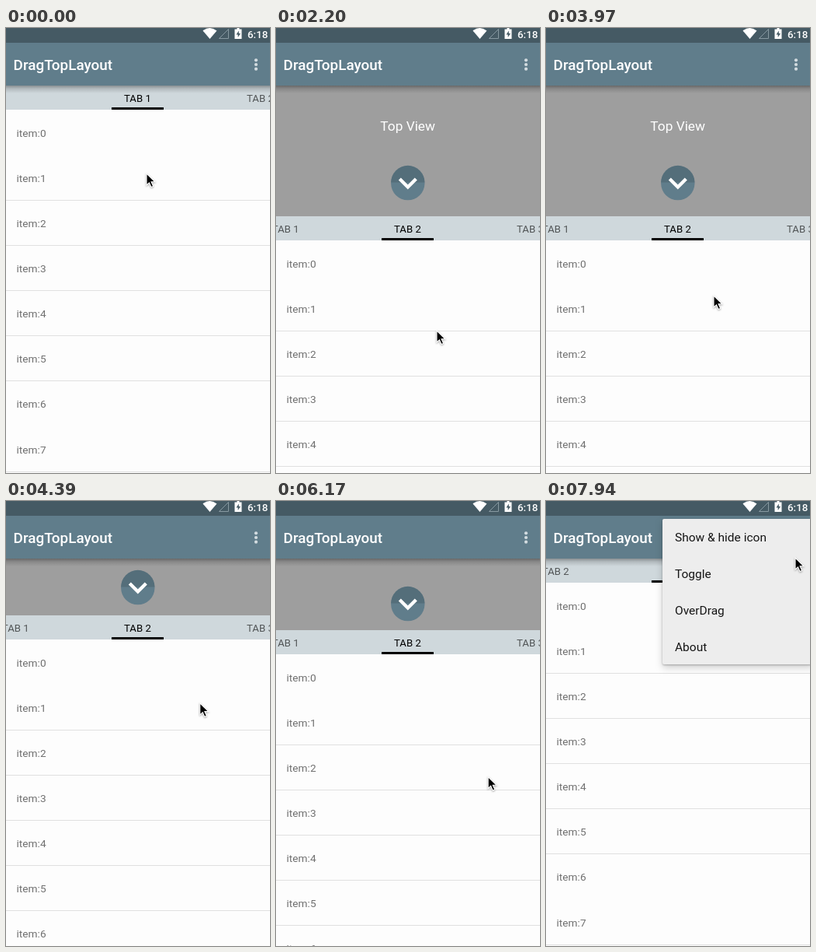
These frames come from a looping animation (340x572 px, 8 s). An HTML page:

```html
<!DOCTYPE html>
<html lang="en">
<head>
<meta charset="utf-8">
<title>DragTopLayout</title>
<style>
  html, body { margin: 0; width: 100%; height: 100%; overflow: hidden; background: #fdfdfd; }
  svg { display: block; width: 100%; height: 100%; }
  text { font-family: Roboto, sans-serif; }
  .item { font-size: 13.7px; fill: #707070; }
  .tab { font-size: 13.2px; fill: #000; }
  .menu text { font-size: 15.5px; fill: #151515; }
  .menu rect { filter: drop-shadow(0 1px 1px rgba(0, 0, 0, .25)) drop-shadow(0 4px 5px rgba(0, 0, 0, .18)); }
  .mouse { filter: drop-shadow(0 1px 1px rgba(0, 0, 0, .35)); }
</style>
</head>
<body>
<svg viewBox="0 0 340 572">
  <defs>
    <linearGradient id="shade" x2="0" y2="1">
      <stop offset="0" stop-opacity=".34"/>
      <stop offset=".4" stop-opacity=".14"/>
      <stop offset="1" stop-opacity="0"/>
    </linearGradient>
  </defs>

  <rect y="74" width="340" height="168" fill="#9e9e9e"/>
  <g id="top">
    <text x="169.7" y="132" font-size="17.3" fill="#fff" text-anchor="middle">Top View</text>
    <circle cx="169.8" cy="199.6" r="21.7" fill="#607d8b"/>
    <path d="M148.1 198.5a21.7 21.7 0 0 1 43.4 0z" fill="#546e7a"/>
    <path d="M159.3 194l10.5 10.5 10.5-10.5" fill="none" stroke="#fff" stroke-width="4.4"/>
  </g>

  <g id="content">
    <rect width="340" height="31" fill="#cfd8dc"/>
    <rect y="31" width="340" height="500" fill="#fdfdfd"/>
    <g id="lines" fill="#e0e0e0"></g>
    <g id="pages"></g>
    <g id="tabs"></g>
    <rect id="bar" y="28" width="67" height="3"/>
  </g>

  <rect y="74" width="340" height="10" fill="url(#shade)"/>
  <rect y="19" width="340" height="55" fill="#607d8b"/>
  <rect width="340" height="19" fill="#455a64"/>
  <text x="9.6" y="54" font-size="18.9" font-weight="500" fill="#fff">DragTopLayout</text>
  <g fill="#d3dce0">
    <circle cx="322" cy="41.3" r="2.1"/>
    <circle cx="322" cy="47" r="2.1"/>
    <circle cx="322" cy="52.7" r="2.1"/>
  </g>
  <path d="M253.5 3.5q9-7 18 0l-9 10.5z" fill="#fff"/>
  <path d="M274.5 13.5l12-12v12z" fill="none" stroke="#8799a1"/>
  <path d="M294.5 1.5h3V0h3v1.5h3V14h-9z" fill="#fff"/>
  <path d="M299.8 3.5l-3.3 5h2.2V12l3.3-5h-2.2z" fill="#455a64"/>
  <text x="311" y="13" font-size="13.4" font-weight="500" fill="#fff">6:18</text>

  <g id="menu" class="menu">
    <rect x="150" y="23" width="194" height="187" rx="2" fill="#ededed"/>
  </g>

  <g id="mouse">
    <path class="mouse" d="M0 0v15l3.5-3.2 2.5 5.7 2.6-1.1-2.5-5.6H11z" stroke="#fff" stroke-width="1.1"/>
  </g>
</svg>
<script>
const LOOP = 8000, STEP = 147.04, OPEN = 168, WIDTH = 340, ROW = 58.1, TABS = 3;
const $ = id => document.getElementById(id);

function add(parent, tag, attrs, text = '') {
  const el = document.createElementNS('http://www.w3.org/2000/svg', tag);
  for (const k in attrs) el.setAttribute(k, attrs[k]);
  el.textContent = text;
  return parent.appendChild(el);
}
const move = (el, x, y) => el.setAttribute('transform', `translate(${x} ${y})`);

// Progress 0..1 between two times: plain, smooth, or settling
const part = (t, a, b) => Math.min(1, Math.max(0, (t - a) / (b - a)));
const glide = (t, a, b) => { const x = part(t, a, b); return x * x * (3 - 2 * x); };
const settle = (t, a, b) => 1 - (1 - part(t, a, b)) ** 5;

// Panel height: pulled down, pushed up, flicked open, pushed up
const drop = t => OPEN * (part(t, 147, 640) - part(t, 4050, 4430)
  + settle(t, 4859, 5173) - part(t, 6040, 6340));

// Page position: forward, forward, back, forward
const page = t => glide(t, 1470, 2060) + glide(t, 2490, 2940)
  - glide(t, 3090, 3530) + glide(t, 6436, 7016);

// Pointer stops: step, x, y
const stops = [
  [0, 181, 187], [5, 195, 419], [10, 270, 410], [15, 207, 389], [27, 216, 344],
  [32, 312, 105], [34, 316, 156], [36, 318, 50], [41, 290, 360], [46, 128, 307],
  [48, 200, 200], [51, 321, 48], [54, 321, 73]
];
function pointer(step) {
  const i = Math.max(1, stops.findIndex(s => s[0] >= step));
  const a = stops[i - 1], b = stops[i], k = glide(step, a[0], b[0]);
  return [a[1] + (b[1] - a[1]) * k, a[2] + (b[2] - a[2]) * k];
}

// Every sixth divider is not drawn
for (let i = 1; i < 8; i++)
  if (i % 6) add($('lines'), 'rect', { y: Math.round(147 + ROW * (i - 1)), width: WIDTH, height: 1 });

const pages = [], tabs = [];
for (let n = 0; n < TABS; n++) {
  const list = add($('pages'), 'g', {});
  for (let i = 0; i < 9; i++)
    add(list, 'text', { class: 'item', x: 13.5, y: Math.round(65.8 + ROW * i) }, 'item:' + i);
  pages.push(list);
  tabs.push(add($('tabs'), 'text', { class: 'tab', y: 21 }, 'TAB ' + (n + 1)));
}
['Show & hide icon', 'Toggle', 'OverDrag', 'About'].forEach((s, i) =>
  add($('menu'), 'text', { x: 166, y: 52 + 47 * i }, s));

// Strip with a centred title and its neighbours held at the edges
function drawTabs(p) {
  const cur = Math.round(p), left = 152 - 304 * (p - cur), gap = 96;
  tabs.forEach((tab, n) => {
    const x = n === cur ? left
      : n === cur - 1 ? Math.min(-5.2, left - gap)
      : n === cur + 1 ? Math.max(310, left + gap) : -100;
    tab.setAttribute('x', x);
    tab.setAttribute('opacity', n === cur ? 1 : .6);
  });
  $('bar').setAttribute('x', Math.round(left - 16));
  $('bar').setAttribute('opacity', Math.abs(p % 1 - .5) * 2);
}

function draw(ms) {
  const step = Math.floor((ms % LOOP + 10) / STEP), t = step * STEP, p = page(t);
  move($('content'), 0, 74 + Math.round(drop(t)));
  // The header trails the panel by one screen refresh
  move($('top'), 0, Math.round(drop(t - 16)) - OPEN);
  pages.forEach((list, n) => move(list, WIDTH * (n - p), 0));
  drawTabs(p);
  $('menu').setAttribute('opacity', part(t, 7560, 7720));
  move($('mouse'), ...pointer(step));
}

const start = performance.now();
function tick() {
  draw(performance.now() - start);
  requestAnimationFrame(tick);
}
tick();
</script>
</body>
</html>
```
